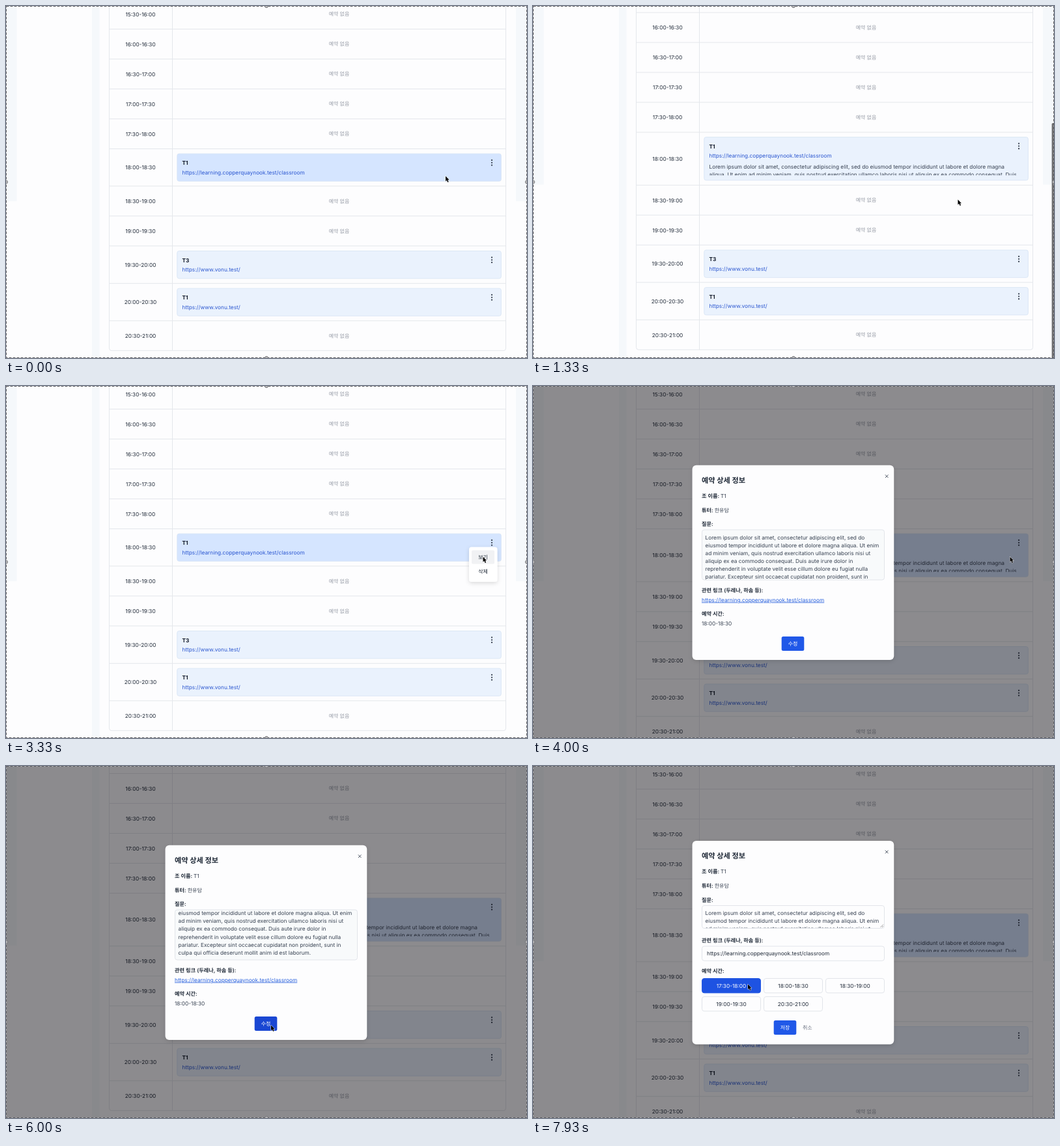
Animation of 800 by 541 pixels, one loop 8 s. Source, as an HTML page:

```html
<!DOCTYPE html>
<html lang="ko">
<head>
<meta charset="utf-8">
<title>예약</title>
<style>
  html, body { margin: 0; width: 100%; height: 100%; overflow: hidden; background: #fdfdfe; }
  svg { display: block; width: 100%; height: 100%; }
  text {
    font-family: Inter, "Noto Sans CJK KR", "Noto Sans CJK", sans-serif;
    font-size: 8.27px; white-space: pre; text-rendering: geometricPrecision;
  }
</style>
</head>
<body>
<svg id="stage" viewBox="0 0 800 541" xmlns="http://www.w3.org/2000/svg">
  <defs>
    <clipPath id="noteClip"><rect x="264" y="265.7" width="494" height="20"/></clipPath>
    <clipPath id="areaClip"><rect x="260" y="221.8" width="279" height="75.6"/></clipPath>
    <clipPath id="editClip"><rect x="260" y="215" width="279" height="34"/></clipPath>
    <filter id="shadow" x="-30%" y="-30%" width="160%" height="170%">
      <feDropShadow dx="0" dy="2" stdDeviation="3" flood-color="#000" flood-opacity=".14"/>
    </filter>
  </defs>
</svg>
<script>
const LOOP = 8000;
const GROW = 24;
const INK = '#1f2937', MUTED = '#9a9fa9', LINE = '#e4e7ec', LINK = '#2a56d0';
const BLUE = '#2058e8', BLUE_DARK = '#1a47d3';
const CARD = '#eaf2fd', CARD_HOVER = '#d5e5ff';
const CLASS_URL = 'https://learning.copperquaynook.test/classroom';
const DOC_URL = 'https://www.vonu.test/';
const LOREM = ('Lorem ipsum dolor sit amet, consectetur adipiscing elit, sed do eiusmod tempor incididunt ut labore ' +
  'et dolore magna aliqua. Ut enim ad minim veniam, quis nostrud exercitation ullamco laboris nisi ut aliquip ' +
  'ex ea commodo consequat. Duis aute irure dolor in reprehenderit in voluptate velit esse cillum dolore eu ' +
  'fugiat nulla pariatur. Excepteur sint occaecat cupidatat non proident, sunt in culpa qui officia deserunt ' +
  'mollit anim id est laborum.').split(' ');

const stage = document.getElementById('stage');

function add(parent, tag, attrs) {
  const node = document.createElementNS('http://www.w3.org/2000/svg', tag);
  set(node, attrs || {});
  parent.appendChild(node);
  return node;
}
function set(node, attrs) {
  for (const k in attrs) node.setAttribute(k, attrs[k]);
}
const group = (parent, attrs) => add(parent, 'g', attrs);
const show = (node, on) => set(node, { visibility: on ? 'inherit' : 'hidden' });
const move = (node, x, y) => set(node, { transform: `translate(${x} ${y})` });

function box(parent, x, y, width, height, fill, attrs) {
  return add(parent, 'rect', { x, y, width, height, fill, ...attrs });
}
// y is the middle of the capital letters
function label(parent, x, y, str, attrs) {
  const size = (attrs && attrs['font-size']) || 8.27;
  const node = add(parent, 'text', { x, y: y + size * 0.364, fill: INK, ...attrs });
  if (attrs && attrs['font-size']) node.style.fontSize = size + 'px';
  node.textContent = str;
  return node;
}
const centered = (parent, x, y, str, attrs) => label(parent, x, y, str, { 'text-anchor': 'middle', ...attrs });

function paragraph(parent, x, y, step, counts) {
  let from = 0;
  counts.forEach((n, i) => {
    label(parent, x, y + i * step, LOREM.slice(from, from + n).join(' '), { fill: '#374151' });
    from += n;
  });
}

// Page
const page = group(stage);
for (const [x, w, h] of [[0, 16.5, 400], [132, 11.5, 900], [783, 17, 400]])
  box(page, x, -100, w, h, '#f5f8fb');
const upper = group(page), lower = group(page);

const hline = (parent, y) => add(parent, 'path', { d: `M158 ${y}H768`, stroke: LINE });

function slotRow(parent, y, height, time, empty) {
  const timeNode = centered(parent, 206.5, y + height / 2, time);
  if (empty) centered(parent, 511.5, y + height / 2, '예약 없음', { fill: MUTED, 'font-size': 8 });
  return timeNode;
}
function card(parent, y, title, url) {
  const rect = box(parent, 262.8, y, 497.5, 42.3, CARD, { stroke: '#d6e4f4', 'stroke-width': 0.8, rx: 3 });
  label(parent, 270.5, y + 14, title, { 'font-weight': 700, fill: '#111827' });
  label(parent, 270.5, y + 28.5, url, { fill: LINK });
  for (const d of [9.9, 13.8, 17.7])
    add(parent, 'circle', { cx: 746, cy: y + d, r: 1.15, fill: '#3b4453' });
  return rect;
}

['15:30-16:00', '16:00-16:30', '16:30-17:00', '17:00-17:30', '17:30-18:00'].forEach((time, i) => {
  const y = -10.5 + 46 * i;
  slotRow(upper, y, 46, time, true);
  hline(upper, y + 46);
});
const mainTime = slotRow(upper, 219.5, 57.5, '18:00-18:30');
const mainCard = card(upper, 227, 'T1', CLASS_URL);
const noteBox = group(upper, { 'clip-path': 'url(#noteClip)' });
const note = group(noteBox);
paragraph(note, 270.5, 272.4, 11.9, [18, 19, 18, 14]);
const noteThumb = box(upper, 746.6, 277, 4.2, 8, '#5f6875', { rx: 2.1 });

hline(lower, 276.8);
slotRow(lower, 277, 46, '18:30-19:00', true);
hline(lower, 322.8);
slotRow(lower, 323, 46, '19:00-19:30', true);
hline(lower, 368.8);
slotRow(lower, 369, 57.5, '19:30-20:00');
card(lower, 376.5, 'T3', DOC_URL);
hline(lower, 426.3);
slotRow(lower, 426.5, 57.5, '20:00-20:30');
card(lower, 434, 'T1', DOC_URL);
hline(lower, 483.8);
slotRow(lower, 484, 46, '20:30-21:00', true);
add(lower, 'path', {
  d: 'M158.5 -100V526Q158.5 529.7 162 529.7H764Q767.5 529.7 767.5 526V-100M255.5 -100V529.7',
  fill: 'none', stroke: LINE
});

const menu = group(stage);
box(menu, 711, 247.5, 43.5, 53.5, '#fff', { rx: 4, filter: 'url(#shadow)' });
box(menu, 715, 252.5, 35, 21, '#f1f2f4', { rx: 2 });
centered(menu, 732.5, 263.2, '보기', { 'font-size': 8 });
centered(menu, 732.5, 285.2, '삭제', { 'font-size': 8 });

const pageThumb = box(stage, 796.6, 180, 4, 361, '#6e6e70', { rx: 1.5 });

// Dialogs
const overlay = box(stage, 0, 0, 800, 541, '#040106', { 'fill-opacity': 0.45 });

function dialog(y, height) {
  const g = group(stage);
  box(g, 244.6, y - 0.3, 309.6, height, '#fdfdfe', { rx: 6, filter: 'url(#shadow)' });
  label(g, 259, y + 22.8, '예약 상세 정보', { 'font-size': 11.2, 'font-weight': 700 });
  add(g, 'path', { d: `M540.9 ${y + 14.4}l4.6 4.6m0 -4.6l-4.6 4.6`, stroke: '#374151', 'stroke-width': 0.9 });
  heading(g, y + 46.8, '조 이름:');
  label(g, 288, y + 46.8, 'T1', { fill: '#374151' });
  heading(g, y + 68.6, '튜터:');
  label(g, 278.7, y + 68.6, '한유담', { fill: '#374151', 'font-size': 8 });
  heading(g, y + 90.5, '질문:');
  return g;
}
function heading(parent, y, str) {
  label(parent, 259, y, str, { 'font-weight': 600, 'font-size': 8.17 });
}
function field(parent, x, y, w, h, fill) {
  return box(parent, x, y, w, h, fill, { rx: 3.5, stroke: '#dfe2e8', 'stroke-width': 0.9 });
}
function solidButton(parent, x, y, str) {
  const rect = box(parent, x - 0.3, y, 34.6, 22, BLUE, { rx: 2.5 });
  centered(parent, x + 17, y + 11, str, { fill: '#fff', 'font-weight': 500, 'font-size': 8 });
  return rect;
}
const LINK_TITLE = '관련 링크 (두레나, 하솜 등):';
const MODAL_LINES = [10, 11, 10, 10, 10, 9, 9];

const view = dialog(122, 299.3);
field(view, 259.5, 221, 280, 77, '#f8fafb');
const areaBox = group(view, { 'clip-path': 'url(#areaClip)' });
const area = group(areaBox);
paragraph(area, 264.5, 232.5, 12.1, MODAL_LINES);
const areaThumb = box(view, 533.7, 237, 4.2, 59, '#66686c', { rx: 2.1 });
heading(view, 314, LINK_TITLE);
label(view, 259, 328.5, CLASS_URL, { fill: '#2860dd', 'text-decoration': 'underline' });
heading(view, 350.3, '예약 시간:');
label(view, 259, 365, '18:00-18:30', { fill: '#374151' });
const editButton = solidButton(view, 382, 385, '수정');

const edit = dialog(115.3, 312.7);
field(edit, 259.5, 214.5, 280, 35, '#fdfdfe');
paragraph(group(edit, { 'clip-path': 'url(#editClip)' }), 264.5, 226.2, 12.1, MODAL_LINES.slice(0, 3));
add(edit, 'path', { d: 'M533.5 248l4.5 -4.5M536 248l2 -2', stroke: '#777', 'stroke-width': 0.7 });
heading(edit, 268, LINK_TITLE);
field(edit, 259.5, 277, 280, 22.3, '#fdfdfe');
label(edit, 267, 288.2, CLASS_URL);
heading(edit, 315.3, '예약 시간:');
const choices = ['17:30-18:00', '18:00-18:30', '18:30-19:00', '19:00-19:30', '20:30-21:00'].map((time, i) => {
  const x = 259.5 + 95 * (i % 3), y = 326.5 + 28 * Math.floor(i / 3);
  return { rect: field(edit, x, y, 90, 22.3, '#fdfdfe'), text: centered(edit, x + 45, y + 11.2, time) };
});
solidButton(edit, 370, 391, '저장');
centered(edit, 421.3, 402, '취소', { fill: '#6b7280', 'font-size': 8 });

// Selection frame and pointer
for (const [stroke, dash] of [['rgba(255,255,255,.4)', 'none'], ['#5c5c60', '4 2']])
  box(stage, 0.5, 0.5, 799, 540, 'none', { stroke, 'stroke-dasharray': dash });
for (const [cx, cy] of [[400, 0], [0, 270.5], [800, 270.5], [400, 541]])
  add(stage, 'circle', { cx, cy, r: 2.6, fill: '#b4b4b6', stroke: '#6d6d70', 'stroke-width': 0.8 });

const pointer = add(stage, 'path', {
  d: 'M0 0V7.9L1.8 6.3L3.2 9.4L4.6 8.8L3.3 5.8H5.6Z',
  fill: '#000', stroke: '#fff', 'stroke-width': 1, 'paint-order': 'stroke'
});

// Motion
const POINTER = [
  [0, 675, 261.5], [150, 675, 262], [800, 657, 397.5], [1070, 657, 397.5], [1500, 650, 245.5],
  [2670, 650, 245.5], [3060, 744, 240], [3160, 744, 240], [3320, 732.5, 262.5], [4000, 732.5, 262.5],
  [4130, 449, 266], [4330, 449, 266], [4400, 416, 286.5], [5530, 416, 286.5], [5870, 407, 398.5],
  [6470, 407, 398.5], [6800, 332, 337], [7870, 332, 337], [7930, 330, 335.5]
];
const SCROLL = [
  [500, 0], [570, -3], [630, -20], [830, -26], [1000, -26], [1700, -24.8], [2100, -24.8], [2600, -24.2],
  [2700, -24.2], [2701, 0], [5130, 0], [5200, -3], [5260, -20], [5450, -24], [6069, -24], [6070, 0]
];
const NOTE_SCROLL = [[1500, 0], [1930, 28.7]];
const AREA_SCROLL = [[4670, 0], [4860, 18.3]];
const SELECT = [[7270, 0], [7500, 1]];

function at(keys, t) {
  if (t <= keys[0][0]) return keys[0].slice(1);
  for (let i = 1; i < keys.length; i++) {
    const a = keys[i - 1], b = keys[i];
    if (t < b[0]) {
      const u = (t - a[0]) / (b[0] - a[0]), e = u * u * (3 - 2 * u);
      return a.slice(1).map((v, k) => v + (b[k + 1] - v) * e);
    }
  }
  return keys[keys.length - 1].slice(1);
}
const within = (t, a, b) => t >= a && t < b;
const fade = (t, a, b) => Math.max(0, Math.min(1, (t - a) / 70, (b - t) / 200));
const mix = (a, b, u) => `rgb(${a.map((v, i) => Math.round(v + (b[i] - v) * u))})`;

function paintChoice({ rect, text }, u) {
  set(rect, { fill: mix([253, 253, 254], [30, 83, 226], u), stroke: mix([223, 226, 232], [30, 83, 226], u) });
  set(text, { fill: mix([31, 41, 55], [255, 255, 255], u) });
}

function draw(t) {
  const open = within(t, 100, 2700) || t >= 3600;
  const grow = open ? GROW : 0;
  const [shift] = at(SCROLL, t);

  move(page, 0, shift);
  move(lower, 0, grow);
  move(mainTime, 0, grow / 2);
  set(mainCard, { height: 42.3 + grow, fill: within(t, 400, 1420) ? CARD : CARD_HOVER });
  show(noteBox, open);
  const noteY = t < 2700 ? at(NOTE_SCROLL, t)[0] : 0;
  move(note, 0, -noteY);
  set(noteThumb, { y: 266 + noteY / 28.7 * 11, opacity: fade(t, 1500, 2500) });

  set(pageThumb, {
    y: 180 + Math.max(0, shift + GROW) * 0.667,
    opacity: Math.max(fade(t, 500, 1700), fade(t, 5130, 5950))
  });

  show(menu, within(t, 3160, 3600));
  show(overlay, t >= 3600);
  show(view, within(t, 3600, 6070));
  show(edit, t >= 6070);

  const [areaY] = at(AREA_SCROLL, t);
  move(area, 0, -areaY);
  set(areaThumb, { y: 223 + areaY / 18.3 * 14, opacity: fade(t, 4670, 5600) });
  set(editButton, { fill: t >= 5800 ? BLUE_DARK : BLUE });

  const [picked] = at(SELECT, t);
  paintChoice(choices[0], picked);
  paintChoice(choices[1], 1 - picked);

  move(pointer, ...at(POINTER, t));
}

const start = performance.now();
function tick() {
  draw((performance.now() - start) % LOOP);
  requestAnimationFrame(tick);
}
draw(0);
requestAnimationFrame(tick);
</script>
</body>
</html>
```
